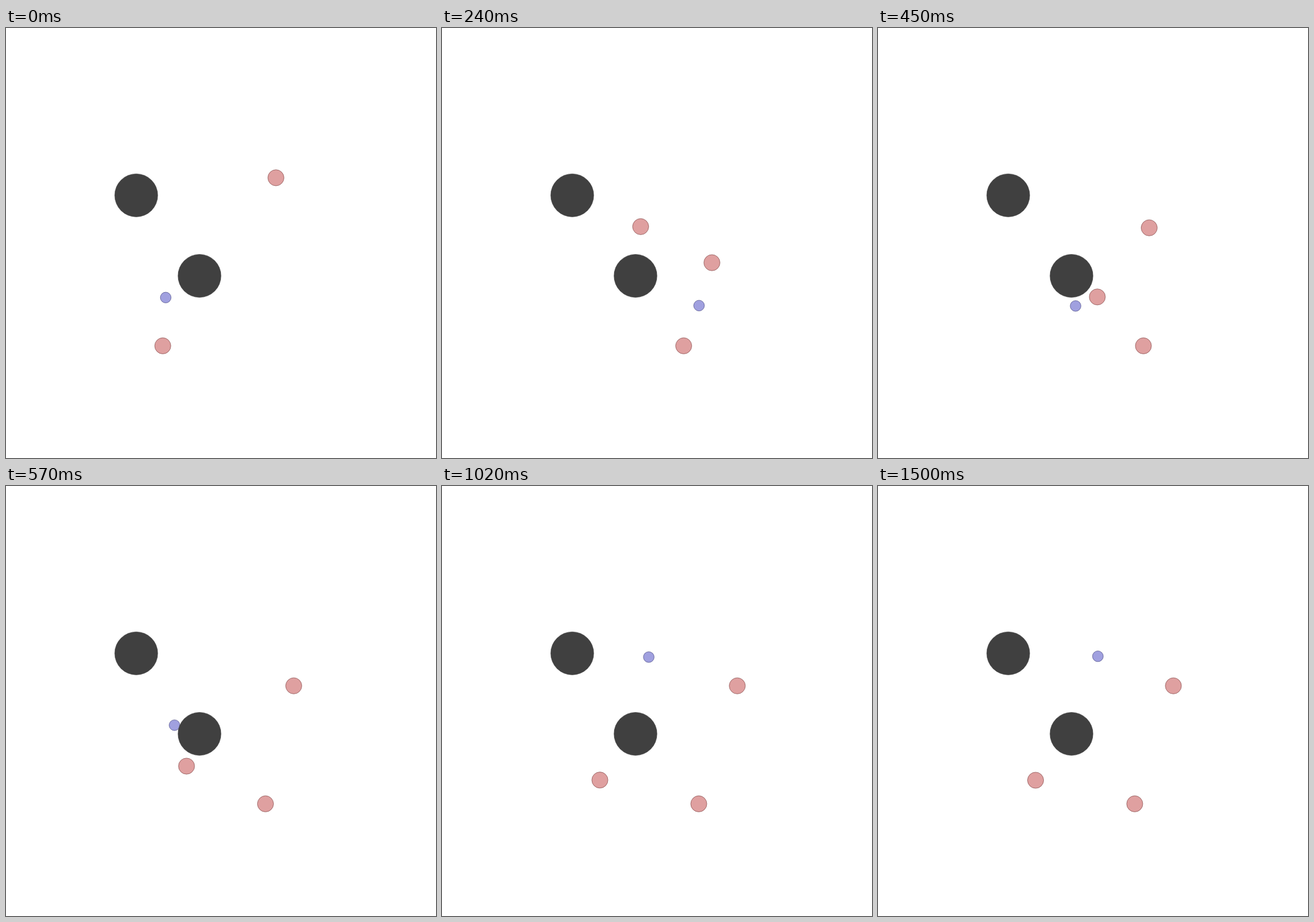
An HTML page that plays this animation: 700 by 700 pixels, repeating every 1.53 s.

```html
<!DOCTYPE html>
<html lang="en">
<head>
<meta charset="utf-8">
<title>Pursuit</title>
<style>
  html, body { margin: 0; width: 100%; height: 100%; overflow: hidden; background: #fff; }
  svg { display: block; width: 100vw; height: 100vh; }
  .chaser { fill: #dfa0a0; stroke: rgba(96, 32, 32, .5); }
  .runner { fill: #a0a0df; stroke: rgba(32, 32, 96, .5); }
  .rock { fill: #404040; stroke: rgba(64, 64, 64, .6); }
</style>
</head>
<body>
<svg id="stage" viewBox="0 0 700 700"></svg>
<script>
const STEP_MS = 30, STEPS = 51, DRAG = 0.75;

const kinds = {
  chaser: { r: 13.1, push: 15.75, top: 17.5 },
  runner: { r: 8.75, push: 28, top: 22.75 },
  rock: { r: 35 }
};
const dirs = { L: [-1, 0], R: [1, 0], U: [0, -1], D: [0, 1] };

// Plans are run lengths of pushes; "-" means coasting.
const agents = [
  { kind: 'chaser', x: 439.4, y: 243.8, plan: 'D10 L8' },
  { kind: 'chaser', x: 255.2, y: 517.4, plan: 'R10 -2 L1' },
  { kind: 'chaser', x: 224, y: 259.5, plan: 'D5 R9' },
  { kind: 'runner', x: 260, y: 438.8, plan: 'R2 -1 R3 -4 L6 U5 -8 R1' }
];
const rocks = [
  { kind: 'rock', x: 212, y: 272.4 },
  { kind: 'rock', x: 315, y: 403.5 }
];

const expand = plan => plan.split(' ').map(p => p[0].repeat(+p.slice(1))).join('');

// Damped motion with a speed cap; rocks push back in proportion to overlap.
function trace({ kind, x, y, plan }) {
  const { r, push, top } = kinds[kind];
  const moves = expand(plan);
  const path = [[x, y]];
  let vx = 0, vy = 0;
  for (let i = 0; i < STEPS - 1; i++) {
    const [ax, ay] = dirs[moves[i]] || [0, 0];
    vx = vx * DRAG + ax * push;
    vy = vy * DRAG + ay * push;
    for (const rock of rocks) {
      const dx = x - rock.x, dy = y - rock.y, dist = Math.hypot(dx, dy);
      const overlap = Math.max(0, r + kinds.rock.r - dist);
      vx += overlap * dx / dist;
      vy += overlap * dy / dist;
    }
    const speed = Math.hypot(vx, vy);
    if (speed > top) {
      vx *= top / speed;
      vy *= top / speed;
    }
    x += vx;
    y += vy;
    path.push([x, y]);
  }
  return path;
}

const stage = document.getElementById('stage');

function place(node, x, y) {
  node.setAttribute('cx', x.toFixed(2));
  node.setAttribute('cy', y.toFixed(2));
}

function disc({ kind, x, y }) {
  const node = document.createElementNS('http://www.w3.org/2000/svg', 'circle');
  node.setAttribute('class', kind);
  node.setAttribute('r', kinds[kind].r);
  place(node, x, y);
  return stage.appendChild(node);
}

const movers = agents.map(a => ({ node: disc(a), path: trace(a) }));
rocks.forEach(disc);

let start;
function draw(now) {
  start ??= now;
  const step = Math.floor(Math.max(0, now - start) / STEP_MS) % STEPS;
  for (const { node, path } of movers) place(node, ...path[step]);
  requestAnimationFrame(draw);
}
requestAnimationFrame(draw);
</script>
</body>
</html>
```
